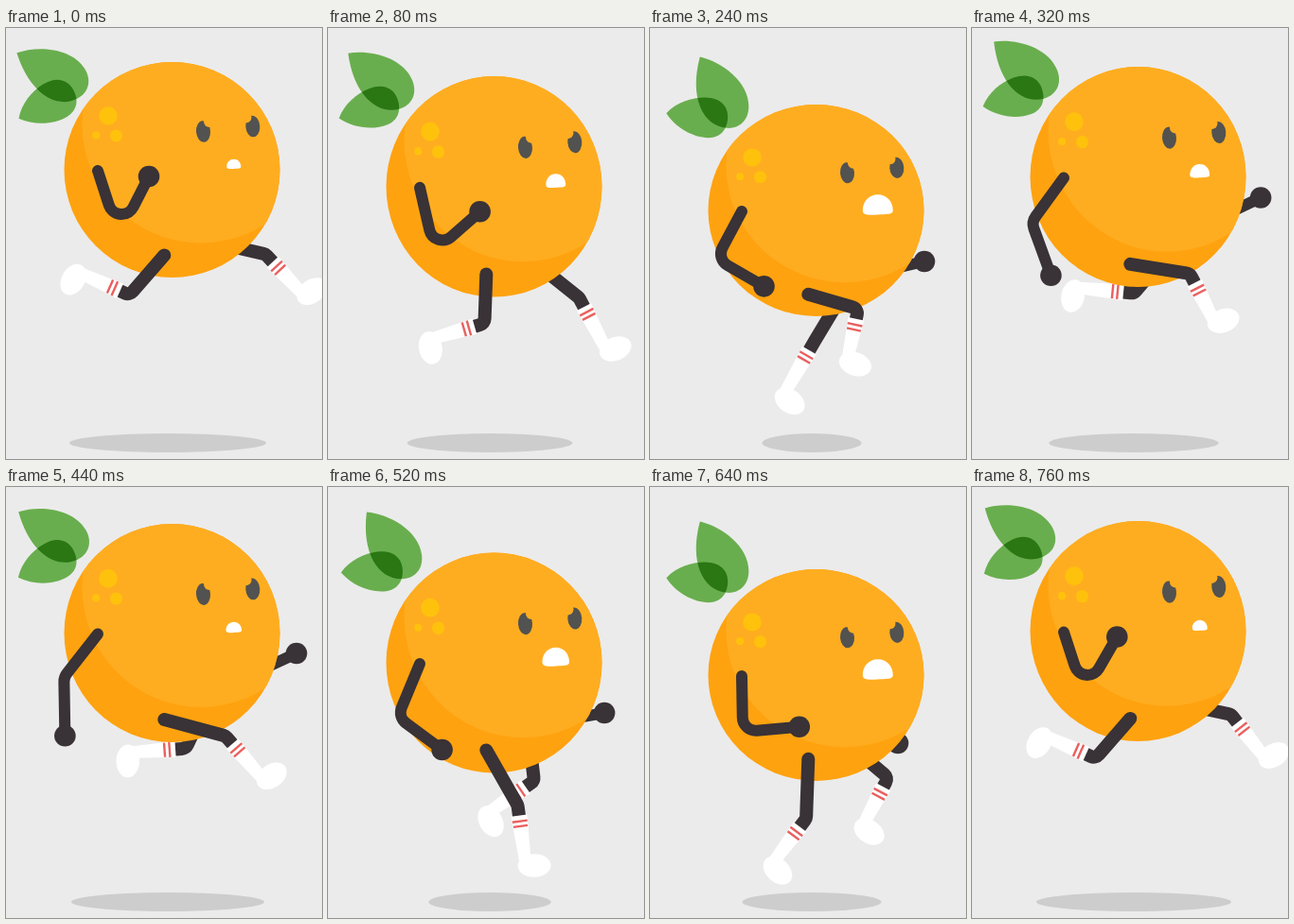
Recreate the animation shown at these times as an HTML page with a canvas. Size 334 by 456 pixels, loop 0.8 s.

```html
<!DOCTYPE html>
<html lang="en">
<head>
<meta charset="utf-8">
<title>Running orange</title>
<style>
  html, body { margin: 0; width: 100%; height: 100%; overflow: hidden; background: #ebebeb; }
  canvas { display: block; }
</style>
</head>
<body>
<canvas id="stage" width="334" height="456"></canvas>
<script>
const ctx = document.getElementById('stage').getContext('2d');
const LOOP = 800, STEP = 40;
const BODY_X = 175.5, RADIUS = 114;
const COLOR = {
  back: '#ebebeb', shadow: '#cdcdcd', peel: '#ffad20', shade: '#ffa20f', spot: '#ffc20c',
  eye: '#525250', limb: '#393236', stripe: '#e9605f', leaf: '#69ae4e', leafDark: '#2a7714'
};

// Each key row: time in ms, then the animated values.
const bodyKeys = [ // centre y, vertical radius
  [0, 150, 114], [40, 154.5, 115.5], [100, 176, 117], [160, 200, 114], [195, 203, 111],
  [240, 193, 112], [310, 160, 116.5], [360, 151, 115.5], [400, 149.5, 114], [440, 154.5, 115.5],
  [500, 177, 117], [560, 201, 114], [600, 204.5, 111], [640, 199, 112], [710, 164, 117], [760, 152.5, 116.5]
];
const leafKeys = [
  [0, -32], [40, -31], [160, 0], [240, 0.5], [360, -30], [400, -32],
  [440, -30], [560, 0], [640, 0.5], [760, -29.5]
];
const mouthKeys = [
  [0, 0.47], [40, 0.5], [160, 1], [240, 1], [360, 0.5], [400, 0.47],
  [440, 0.52], [560, 1], [640, 1], [760, 0.5]
];
const shadowKeys = [
  [0, 104], [40, 102], [160, 47.5], [195, 45], [240, 52.5], [360, 102], [400, 104],
  [440, 102], [560, 51], [585, 50], [640, 73.5], [760, 103]
];
// Limbs: upper angle, upper length, lower angle, lower length
const nearLegKeys = [
  [0, 131, 56, 204, 61], [40, 115, 54, 180, 62], [160, 44, 50, 136, 62], [240, 16, 55, 102, 58],
  [360, 8, 66, 50, 62], [400, 8, 66, 45, 63], [440, 15, 67, 49, 64], [560, 79, 67, 101, 66],
  [640, 92, 63, 127, 62], [760, 131, 56, 204, 61]
];
const farLegKeys = [
  [0, 13, 64, 47, 62], [40, 18, 65, 50, 63], [160, 97, 75, 100, 71], [240, 121, 74, 120, 68],
  [360, 132, 58, 204, 62], [400, 131, 56, 204, 61], [440, 115, 52, 176, 62], [560, 68, 50, 134, 62],
  [640, 40, 52, 118, 60], [760, 12, 63, 52, 62]
];
const nearArmKeys = [
  [0, 72, 72, -63, 70], [40, 74, 72, -56, 68], [160, 87, 60, -2, 57], [240, 118, 57, 30, 58],
  [320, 126, 58, 70, 60], [400, 129, 58, 92, 62], [440, 128, 58, 89, 62], [560, 103, 62, 12, 57],
  [640, 89, 59, -5, 60], [760, 72, 69, -60, 70]
];
const farArmKeys = [ // hand x, hand y below body centre, forearm angle
  [0, 210, 60, 0], [160, 264, 72, 8], [240, 290, 54, -13], [360, 308, 12, -28], [400, 308, 10, -28],
  [440, 307, 21.5, -25], [560, 282, 64, -2], [640, 262, 72, 8], [760, 210, 60, 0]
];

// Periodic monotone cubic interpolation of a key table.
function sample(keys, t) {
  const n = keys.length;
  const at = i => {
    const wraps = Math.floor(i / n), row = keys[i - wraps * n];
    return [row[0] + wraps * LOOP, ...row.slice(1)];
  };
  let i = n - 1;
  while (i > 0 && keys[i][0] > t) i--;
  const [p, a, b, q] = [at(i - 1), at(i), at(i + 1), at(i + 2)];
  const h = b[0] - a[0], u = (t - a[0]) / h;
  const tangent = (s0, s1) => s0 * s1 <= 0 ? 0 : 2 * s0 * s1 / (s0 + s1);
  return a.slice(1).map((_, k) => {
    const c = k + 1;
    const slope = (from, to) => (to[c] - from[c]) / (to[0] - from[0]);
    const mid = slope(a, b);
    const m0 = tangent(slope(p, a), mid) * h, m1 = tangent(mid, slope(b, q)) * h;
    return a[c] + u * m0 + u * u * (3 * (b[c] - a[c]) - 2 * m0 - m1)
      + u * u * u * (2 * (a[c] - b[c]) + m0 + m1);
  });
}

const rad = deg => deg * Math.PI / 180;
const reach = ([x, y], deg, len) => [x + len * Math.cos(rad(deg)), y + len * Math.sin(rad(deg))];

function ellipse(x, y, rx, ry, color, tilt = 0) {
  ctx.fillStyle = color;
  ctx.beginPath();
  ctx.ellipse(x, y, rx, ry, tilt, 0, Math.PI * 2);
  ctx.fill();
}
const disc = (x, y, r, color) => ellipse(x, y, r, r, color);

function bend(start, joint, end, radius, width) {
  ctx.strokeStyle = COLOR.limb;
  ctx.lineWidth = width;
  ctx.lineCap = ctx.lineJoin = 'round';
  ctx.beginPath();
  ctx.moveTo(...start);
  ctx.arcTo(...joint, ...end, radius);
  ctx.lineTo(...end);
  ctx.stroke();
}

function leg(hip, keys, t) {
  const [thighAngle, thigh, shinAngle, shin] = sample(keys, t);
  const knee = reach(hip, thighAngle, thigh);
  bend(hip, knee, reach(knee, shinAngle, 11), 7, 14);

  // Sock and shoe in shin space: x runs down the shin, -y points to the toe.
  ctx.save();
  ctx.translate(...knee);
  ctx.rotate(rad(shinAngle));
  ctx.fillStyle = '#fff';
  ctx.beginPath();
  ctx.moveTo(11, -8.5);
  ctx.lineTo(shin, -6);
  ctx.lineTo(shin, 6);
  ctx.lineTo(11, 8.5);
  ctx.fill();
  ellipse(shin, -9, 12.3, 17.5, '#fff', 0.1);
  ctx.fillStyle = COLOR.stripe;
  ctx.fillRect(16, -8, 2.4, 16);
  ctx.fillRect(21.3, -7.6, 2.4, 15.2);
  ctx.restore();
}

function nearArm(shoulder, t) {
  const [upperAngle, upper, foreAngle, fore] = sample(nearArmKeys, t);
  const elbow = reach(shoulder, upperAngle, upper);
  const hand = reach(elbow, foreAngle, fore);
  bend(shoulder, elbow, hand, 14, 12);
  disc(...hand, 11.3, COLOR.limb);
}

function farArm(cy, t) {
  const [x, dy, angle] = sample(farArmKeys, t);
  const hand = [x, cy + dy], elbow = reach(hand, angle + 180, 50);
  bend(elbow, elbow, hand, 0, 12);
  disc(...hand, 11.3, COLOR.limb);
}

const bigLeaf = new Path2D('M52 36C75 41 104 62 104 88C104 104 93 112 81 111C55 109 41 78 52 36Z');
const smallLeaf = new Path2D('M17 96C28 84 44 79 58 79C74 79 82 88 82 99C82 113 74 121.5 62 121.5C45 121.5 27 111 17 96Z');

function leaves(top, t) {
  const [angle] = sample(leafKeys, t);
  ctx.save();
  ctx.translate(102, top + 41);
  ctx.rotate(rad(angle));
  ctx.translate(-102, -127);
  ctx.fillStyle = COLOR.leaf;
  ctx.fill(bigLeaf);
  ctx.fill(smallLeaf);
  ctx.clip(bigLeaf);
  ctx.fillStyle = COLOR.leafDark;
  ctx.fill(smallLeaf);
  ctx.restore();
}

function eye(x, y, cutX, cutY) {
  ellipse(x, y, 7.5, 11.3, COLOR.eye, -0.08);
  disc(cutX, cutY, 6, COLOR.peel);
}

function mouth(t) {
  const [size] = sample(mouthKeys, t);
  ctx.save();
  ctx.translate(65.3, -6);
  ctx.scale(size, size);
  ctx.fillStyle = '#fff';
  ctx.beginPath();
  ctx.moveTo(-16, 6);
  ctx.bezierCurveTo(-16, -4, -9, -11, 0, -11);
  ctx.bezierCurveTo(9, -11, 16, -4, 16, 6);
  ctx.bezierCurveTo(16, 11, 8, 10, 0, 10.5);
  ctx.bezierCurveTo(-8, 11, -16, 12, -16, 6);
  ctx.fill();
  ctx.restore();
}

function orange(cy, ry, t) {
  ctx.save();
  ctx.translate(BODY_X, cy);
  ctx.scale(1, ry / RADIUS);
  disc(0, 0, RADIUS, COLOR.shade);
  ctx.save();
  ctx.clip();
  disc(30.5, -48, 125.5, COLOR.peel);
  ctx.restore();
  disc(-67.5, -57, 9.7, COLOR.spot);
  disc(-59, -36, 6.5, COLOR.spot);
  disc(-80.3, -36.5, 4, COLOR.spot);
  eye(33, -40.5, 39.5, -51);
  eye(85.3, -46, 78, -55.5);
  mouth(t);
  ctx.restore();
}

function draw(t) {
  const [cy, ry] = sample(bodyKeys, t);
  ctx.fillStyle = COLOR.back;
  ctx.fillRect(0, 0, 334, 456);
  ellipse(171, 439, sample(shadowKeys, t)[0], 10, COLOR.shadow);
  farArm(cy, t);
  leg([212, cy + 75], farLegKeys, t);
  leaves(cy - ry, t);
  orange(cy, ry, t);
  leg([167.3, cy + ry * 0.793], nearLegKeys, t);
  nearArm([97, cy + 1], t);
}

function tick() {
  const t = performance.now() % LOOP;
  draw(Math.floor(t / STEP) * STEP);
  requestAnimationFrame(tick);
}
tick();
</script>
</body>
</html>
```
